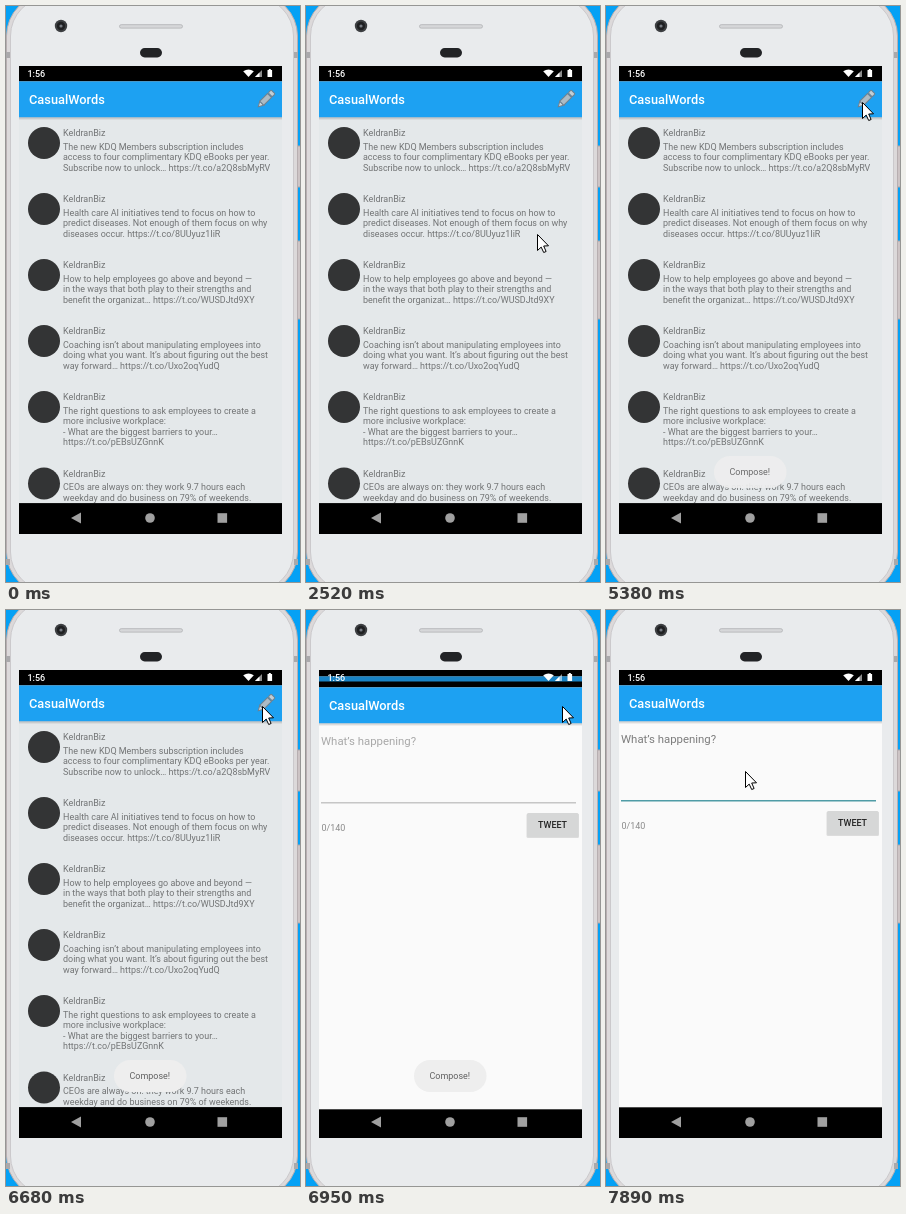
An HTML page with a canvas that plays this animation: 294 by 576 pixels, repeating every 8000 ms.

```html
<!DOCTYPE html>
<html lang="en">
<head>
<meta charset="utf-8">
<title>Compose a post</title>
<style>
  html, body { margin: 0; width: 100%; height: 100%; overflow: hidden; background: #05a1f5; }
  canvas { display: block; }
</style>
</head>
<body>
<canvas id="stage" width="294" height="576"></canvas>
<script>
const ctx = document.getElementById('stage').getContext('2d');
const LOOP = 8000;
const STEP = 140;
const TAP = 4210, TOAST = 4880, OPEN = 6830, TOAST_END = 7070, FOCUS = 7890;
const SCREEN = { x: 13, y: 60, w: 263, h: 468, bar: 75.4, body: 111.2, nav: 497.3 };
const LINE = 10.45;
const GREY = 'rgba(0,0,0,.5)';
const AUTHOR = 'KeldranBiz';
const POSTS = [
  ['The new KDQ Members subscription includes', 'access to four complimentary KDQ eBooks per year.', 'Subscribe now to unlock… https://t.co/a2Q8sbMyRV'],
  ['Health care AI initiatives tend to focus on how to', 'predict diseases. Not enough of them focus on why', 'diseases occur. https://t.co/8UUyuz1IiR'],
  ['How to help employees go above and beyond —', 'in the ways that both play to their strengths and', 'benefit the organizat… https://t.co/WUSDJtd9XY'],
  ['Coaching isn’t about manipulating employees into', 'doing what you want. It’s about figuring out the best', 'way forward… https://t.co/Uxo2oqYudQ'],
  ['The right questions to ask employees to create a', 'more inclusive workplace:', '- What are the biggest barriers to your…', 'https://t.co/pEBsUZGnnK'],
  ['CEOs are always on: they work 9.7 hours each', 'weekday and do business on 79% of weekends.']
];
// Key points of the pointer; it rests during gaps longer than REST.
const REST = 600;
const PATH = [
  { t: 1220, x: 222, y: 558 }, { t: 1340, x: 200, y: 547 }, { t: 1490, x: 183, y: 418 },
  { t: 2520, x: 231, y: 228 }, { t: 2950, x: 260, y: 99 }, { t: 3370, x: 256, y: 96 },
  { t: 7210, x: 220, y: 115 }, { t: 7740, x: 139, y: 161 }
];

const clamp = v => Math.max(0, Math.min(1, v));
const easeOut = u => 1 - (1 - u) ** 1.5;
const hold = (t, step) => Math.floor(t / step) * step;

function pointerAt(t) {
  const i = PATH.findLastIndex(p => p.t <= t);
  if (i < 0) return null;
  const from = PATH[i], to = PATH[i + 1];
  if (!to || to.t - from.t > REST) return from;
  const u = easeOut(hold(t - from.t, STEP) / (to.t - from.t));
  return { x: Math.round(from.x + (to.x - from.x) * u), y: Math.round(from.y + (to.y - from.y) * u) };
}

function rect(x, y, w, h, fill) {
  ctx.fillStyle = fill;
  ctx.fillRect(x, y, w, h);
}
function band(top, bottom, fill) {
  rect(SCREEN.x, top, SCREEN.w, bottom - top, fill);
}
function paint(fill, stroke) {
  ctx.fillStyle = fill;
  ctx.fill();
  if (stroke) {
    ctx.strokeStyle = stroke;
    ctx.lineWidth = 1;
    ctx.stroke();
  }
}
function pill(x, y, w, h, r, fill, stroke) {
  ctx.beginPath();
  ctx.roundRect(x, y, w, h, r);
  paint(fill, stroke);
}
function disc(x, y, r, fill) {
  ctx.beginPath();
  ctx.arc(x, y, r, 0, Math.PI * 2);
  paint(fill);
}
function poly(points, fill, stroke) {
  ctx.beginPath();
  points.forEach(([x, y]) => ctx.lineTo(x, y));
  ctx.closePath();
  paint(fill, stroke);
}
function text(str, x, y, fill, size = 8.96, weight = 400) {
  ctx.font = `${weight} ${size}px Roboto, sans-serif`;
  ctx.fillStyle = fill;
  ctx.fillText(str, x, y);
}
function layer(clipTop, dy, draw) {
  ctx.save();
  ctx.beginPath();
  ctx.rect(SCREEN.x, clipTop, SCREEN.w, SCREEN.y + SCREEN.h - clipTop);
  ctx.clip();
  ctx.translate(0, dy);
  draw();
  ctx.restore();
}

function drawPhone() {
  rect(0, 0, 294, 576, '#05a1f5');
  pill(290, 140, 6, 41, 1, '#cdc4c5', '#aaa5a7');
  pill(290, 235, 6, 78, 1, '#cdc4c5', '#aaa5a7');
  pill(0.5, -12, 291, 600, 42, '#dcd9da', '#b8afb1');
  pill(4.5, -9, 283, 594, 39, '#e9ebed', '#cbc9cc');
  for (const x of [0, 288]) for (const y of [46, 553]) rect(x, y, 4, 6, '#aaa9ab');
  disc(55, 20, 6.2, '#3d3f42');
  disc(55, 20, 4.2, '#1f2022');
  disc(55, 20, 1.6, '#787c84');
  pill(113.5, 18.7, 63, 3.4, 1.7, '#d6d7d9', '#b9babd');
  pill(134, 42, 22, 9.5, 4.7, '#222326');
}

function drawActionBar() {
  const shade = ctx.createLinearGradient(0, SCREEN.body, 0, SCREEN.body + 3);
  shade.addColorStop(0, 'rgba(0,0,0,.22)');
  shade.addColorStop(1, 'rgba(0,0,0,0)');
  band(SCREEN.body, SCREEN.body + 3, shade);
  band(SCREEN.bar, SCREEN.body, '#1da1f2');
  text('CasualWords', 23, 97.6, '#fff', 12.8, 500);
}

function drawPencil() {
  const edge = '#70828f';
  ctx.save();
  ctx.translate(260, 93);
  ctx.rotate(-Math.PI / 4);
  poly([[-11, 0], [-6, -2.8], [-6, 2.8]], '#d0d8dd', edge);
  pill(-6, -2.8, 11, 5.6, 0, '#adbbc5', edge);
  pill(6, -2.8, 4, 5.6, 1, '#c3ced5', edge);
  ctx.restore();
}

function drawWindow(fill) {
  band(SCREEN.y, SCREEN.nav, '#000');
  band(SCREEN.bar, SCREEN.nav, fill);
}

function drawList(t) {
  drawWindow('#e4e8ea');
  let y = 127;
  for (const lines of POSTS) {
    disc(38, y + 10, 16, '#333435');
    text(AUTHOR, 57, y + 3.2, GREY);
    lines.forEach((line, i) => text(line, 57, y + 16.8 + i * LINE, GREY));
    y += 34.65 + lines.length * LINE;
  }
  drawActionBar();
  if (t >= TAP && t < TAP + 520) disc(260, 92.5, 12.8, 'rgba(200,200,200,.3)');
  drawPencil();
}

function drawNav() {
  band(SCREEN.nav, SCREEN.y + SCREEN.h, '#000');
  poly([[65, 512], [75, 506.5], [75, 517.5]], '#a0a0a0');
  disc(144, 512, 4.8, '#a0a0a0');
  rect(211.5, 507.2, 9.6, 9.6, '#a0a0a0');
}

function drawComposer(focused) {
  drawWindow('#fafafa');
  drawActionBar();
  text('What’s happening?', 15, 132.6, focused ? '#7c7c7c' : '#a8a8a8', 11.4);
  rect(15, 190, 255, 1.5, focused ? '#4f9ca6' : '#c6c6c6');
  text('0/140', 15.5, 219.3, '#8a8a8a');
  pill(220.5, 201.5, 52.5, 24.5, 1.5, 'rgba(0,0,0,.12)');
  pill(221, 201, 51.5, 24, 1.5, '#d6d7d7');
  text('TWEET', 232, 216.3, '#222', 8.96, 500);
}

function drawStatus() {
  text('1:56', 21.5, 71, '#fff', 9, 500);
  ctx.beginPath();
  ctx.moveTo(242.5, 71);
  ctx.lineTo(237.2, 65.2);
  ctx.quadraticCurveTo(242.5, 61.8, 247.8, 65.2);
  paint('#fff');
  poly([[249, 71], [256, 64], [256, 71]], 'rgba(255,255,255,.55)');
  poly([[249, 71], [253.5, 66.5], [253.5, 71]], '#fff');
  rect(261.5, 64, 4.6, 7, '#fff');
  rect(262.8, 63, 2, 1, '#fff');
}

function drawToast(t) {
  const fadeIn = clamp((hold(t - TOAST, STEP) + STEP) / 600);
  const fadeOut = clamp(1 - hold(t - TOAST_END, STEP) / 400);
  ctx.globalAlpha = t < TOAST ? 0 : Math.min(fadeIn, fadeOut);
  pill(108, 450, 72.5, 32, 16, '#eeeeee');
  text('Compose!', 123.5, 469.2, '#606060');
  ctx.globalAlpha = 1;
}

function drawPointer({ x, y }) {
  const shape = [[0, 0], [0, 16], [3.7, 12.6], [6.2, 18], [8.6, 17], [6.2, 11.5], [11, 11.3]];
  poly(shape.map(([px, py]) => [x + 0.5 + px, y + 0.5 + py]), '#fff', '#000');
}

function drawScene(t) {
  const opening = t >= OPEN;
  // distance the new screen still has to rise
  const rise = opening ? 11 * 0.15 ** Math.floor((t - OPEN) / 120) : 0;
  drawPhone();
  band(SCREEN.y, SCREEN.y + SCREEN.h, '#000');
  layer(SCREEN.y, opening ? Math.round(0.55 * rise - 10) : 0, () => drawList(t));
  if (opening) band(SCREEN.y, SCREEN.nav, `rgba(0,0,0,${0.2 - 0.008 * rise})`);
  drawNav();
  if (opening) layer(SCREEN.y + 7 * rise, Math.round(rise), () => drawComposer(t >= FOCUS));
  drawStatus();
  drawToast(t);
  const pointer = pointerAt(t);
  if (pointer) drawPointer(pointer);
}

const start = performance.now();
function frame() {
  drawScene((performance.now() - start) % LOOP);
  requestAnimationFrame(frame);
}
frame();
</script>
</body>
</html>
```
